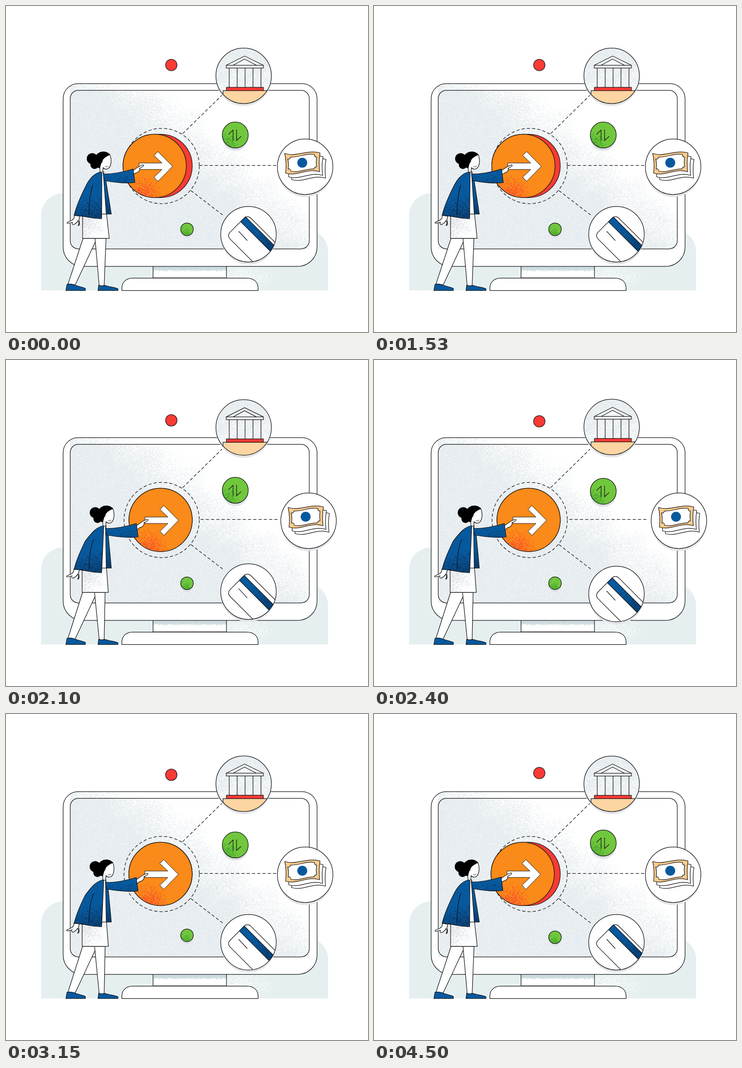
Write an HTML page with a canvas that moves like this. It is 789x710 px and loops after 4530 ms.

```html
<!DOCTYPE html>
<html lang="en">
<head>
<meta charset="utf-8">
<title>Send money</title>
<style>
html, body { margin: 0; width: 100%; height: 100%; overflow: hidden; background: #fff; }
canvas { display: block; width: 789px; height: 710px; }
</style>
</head>
<body>
<canvas id="stage" width="789" height="710"></canvas>
<script>
const LOOP = 4530;
const INK = '#121214', BLUE = '#07599d', NAVY = '#0a3765', ORANGE = '#fa8a19', RED = '#fa3a35',
  GREEN = '#70c73c', MOSS = '#3a982c', SAND = '#fdd5a2', TAN = '#fccb8a', TEAL = '#e6eff0', MIST = '#e6ecef';
const ctx = document.getElementById('stage').getContext('2d');

// Timing
const clamp = (v, a = 0, b = 1) => Math.min(b, Math.max(a, v));
const ease = u => u * u * (3 - 2 * u);
function track(t, keys) {
  if (t <= keys[0][0]) return keys[0][1];
  for (let i = 1; i < keys.length; i++) {
    const [t0, a] = keys[i - 1], [t1, b] = keys[i];
    if (t < t1) return a + (b - a) * ease((t - t0) / (t1 - t0));
  }
  return keys[keys.length - 1][1];
}
const TRACKS = {
  press: [[1400, 0], [2000, 1], [3100, 1], [3700, 0]],
  bank: [[1750, 0], [2250, -6.5], [3180, 0]],
  pull: [[1890, 0], [2280, 13.2], [3180, 0]],
  red: [[1500, 0], [2800, 6.5], [4000, -6.2], [4500, 0]],
  swap: [[1500, 0], [2800, 6.2], [4000, -3.6], [4500, 0]],
  pea: [[2300, 0], [3300, -4.5], [4500, 0]]
};

// Drawing helpers
function paint(path, fill, stroke = INK, width = 1.25) {
  if (fill) { ctx.fillStyle = fill; ctx.fill(path); }
  if (stroke) { ctx.strokeStyle = stroke; ctx.lineWidth = width; ctx.stroke(path); }
}
const shape = (d, fill, stroke, width) => paint(new Path2D(d), fill, stroke, width);
const disc = (x, y, r) => { const p = new Path2D(); p.arc(x, y, r, 0, 7); return p; };
const box = (x, y, w, h, r = 0) => { const p = new Path2D(); p.roundRect(x, y, w, h, r); return p; };
function inside(path, draw) {
  ctx.save();
  ctx.clip(path);
  draw();
  ctx.restore();
}
function shifted(x, y, draw) {
  ctx.save();
  ctx.translate(x, y);
  draw();
  ctx.restore();
}
function textured(path, fill, texture) {
  paint(path, fill, null);
  inside(path, texture);
  paint(path, null);
}

// Speckle textures, built once
let seed = 7;
function rand() {
  seed = (seed + 0x6d2b79f5) | 0;
  let r = Math.imul(seed ^ (seed >>> 15), 1 | seed);
  r ^= r + Math.imul(r ^ (r >>> 7), 61 | r);
  return ((r ^ (r >>> 14)) >>> 0) / 4294967296;
}
function grain(x, y, w, h, color, density) {
  const c = document.createElement('canvas');
  c.width = w; c.height = h;
  const g = c.getContext('2d');
  g.fillStyle = color;
  for (let j = 0; j < h; j++)
    for (let i = 0; i < w; i++)
      if (rand() < density(x + i, y + j)) g.fillRect(i, j, 1, 1);
  return () => ctx.drawImage(c, x, y);
}
const cloud = (x, y) => Math.sin(x * .051 + 2 * Math.sin(y * .033)) * Math.cos(y * .043 + Math.sin(x * .029));
const blot = (cx, cy, r, k) => (x, y) => k * clamp(1 - Math.hypot(x - cx, y - cy) / r);

const screenGrain = grain(140, 170, 521, 359, MIST, (x, y) => {
  if (y < 183) return .7 * clamp(1 - (x - 140) / 130);
  const d = (y - 183 - .87 * (x - 270)) / 1.33;
  return clamp(.5 + d / 120 + .12 * cloud(x, y), 0, .93);
});
const neckGrain = grain(320, 568, 160, 14, '#cbdbdf', (x, y) => clamp((578 - y) / 5));
const floorGrain = grain(481, 568, 110, 50, '#ffffff', (x, y) => .45 * clamp(1 - Math.hypot((x - 515) / 75, (y - 590) / 35)));
const buttonGrain = grain(-70, 15, 110, 56, RED, blot(-26, 62, 42, .5));
const swapGrain = grain(-29, -29, 58, 58, MOSS, blot(-20, 20, 28, .6));
const peaGrain = grain(-14, -14, 28, 28, MOSS, blot(-4, 8, 16, .5));
const bankGrain = grain(-61, -61, 122, 94, MIST, (x, y) => clamp(.72 - y / 160 + .2 * cloud(x * 2, y * 2), 0, .9));
const stripeGrain = grain(0, -58, 130, 15, NAVY, x => .75 * clamp((x - 20) / 70));
const coatGrain = grain(146, 360, 86, 105, NAVY, (x, y) => clamp((y - 412) / 65 + (x - 190) / 260, 0, .8));
const sleeveGrain = grain(212, 354, 74, 34, NAVY, (x, y) => .35 * clamp((y - 366) / 22));
const skirtGrain = grain(165, 453, 60, 53, '#dcdfe3', blot(172, 468, 48, .7));

function monitor() {
  shape('M76.500,619.500V456A48,48 0 0 1 124.500,408H400V619.500Z', TEAL, null);
  shape('M440,619.500V488H656A46,46 0 0 1 702,534V619.500Z', TEAL, null);
  floorGrain();
  paint(box(320.5, 560, 160, 32), '#fff', null);
  neckGrain();
  paint(box(320.5, 560, 160, 32), null);
  shape('M252.500,619.500V614C253,601 262,592.500 276,592.500H525C540,592.500 549,601 549.500,614V619.500Z', '#fff');
  textured(box(124.5, 169, 553.5, 398, [33, 33, 42, 42]), '#fff', screenGrain);
  paint(box(140, 183.5, 521, 345.5, 18), null);
}

function dashes(pull) {
  ctx.setLineDash([7, 4.5]);
  shape('M385,278L471,194');
  shape('M403,402L472,455');
  ctx.lineDashOffset = -pull * .38;
  shape('M421,347.300H594');
  ctx.lineDashOffset = 0;
  paint(disc(339.3, 348.5, 82), null);
  ctx.setLineDash([]);
}

function button(x) {
  const cy = 348.3;
  const side = new Path2D();
  side.arc(x, cy, 69, Math.PI / 2, Math.PI * 1.5);
  side.arc(337, cy, 69, -Math.PI / 2, Math.PI / 2);
  side.closePath();
  paint(side, RED);
  textured(disc(x, cy, 69), ORANGE, () => shifted(x, cy, buttonGrain));
  shifted(x - 337, 0, () =>
    shape('M303,342H353L335.500,325.500L344,317L376,349.300L344,382L335.500,373L353,356H303Z', '#fff', INK, 1));
}

function ball(x, y, r, color, texture, drop) {
  if (drop) paint(disc(x, y + drop, r), '#dfe1e5', null);
  const p = disc(x, y, r);
  if (texture) textured(p, color, () => shifted(x, y, texture));
  else paint(p, color);
}

// Round badge with a soft drop below; content uses stage coordinates at rest
function badge(cx, cy, dx, dy, content) {
  shifted(dx, dy, () => {
    paint(disc(cx, cy + 6, 60), '#e3e4e8', null);
    textured(disc(cx, cy, 60.5), '#fff', content);
  });
}

function bank() {
  shifted(518, 152, bankGrain);
  paint(box(473, 184.3, 120, 40), SAND);
  paint(box(480.5, 177, 80.5, 7.3), RED);
  for (let i = 0; i < 5; i++) shape(`M${486.5 + 17.3 * i},135V177`);
  shape('M480,129L520,109L561,129V135H480Z', '#f5f8f9');
  shape('M480,129H561M495,129L520,115.500L546,129');
}

function bills() {
  const note = new Path2D('M607.500,321C632,330 655,312 684.500,320C682,334 682,347 683.500,361C655,352 635,372 609.500,364C611,350 611,336 607.500,321Z');
  shifted(13, 14, () => paint(note, '#fff'));
  shifted(6.5, 8, () => paint(note, '#fff'));
  paint(note, TAN);
  shape('M620,329C638,330 654,320 672,323C672,327 674,329 677,329C676,337 676,344 677,350C674,350 672,352 671,355C654,354 638,364 621,360C621,356 618,354 615,355C616,347 616,340 614,333C618,334 620,332 620,329Z', '#fff');
  paint(disc(645.7, 341.3, 10.8), BLUE, null);
}

function card(slip) {
  ctx.save();
  ctx.translate(481, 500);
  ctx.rotate(Math.PI / 4);
  paint(box(0, -64, 170, 64, 10), '#fff');
  shifted(0, slip, () => textured(box(0, -58, 130, 15), BLUE, stripeGrain));
  ctx.restore();
  shape('M507,490.500L526,511');
}

function woman(p) {
  const skin = '#fff';
  // legs and shoes
  shape(`M${168 - p},506L135,606C141,610 147,610 151,607L195,513V506Z`, skin);
  shape(`M${194 - p},506L203,608C207,611 211,611 214,608L${218 - 2 * p},506Z`, skin);
  shape('M130.500,619.500L133,606C140,604 144,606 149,607C157,611 168,612 173,615V619.500Z', BLUE);
  shape('M200.500,619.500L202,608C209,612 213,607 218,609C227,612 239,613 244,616V619.500Z', BLUE);
  // skirt
  textured(new Path2D(`M${167 - p},453L${167 - p},506H${225 - 2 * p}L219,452Z`), '#fff', skirtGrain);
  // rear hand
  shifted(-p, -p, () => shape('M149,456C149,462 148,464 143,467L134,471C132,473 134,474 137,473L145,471C143,474 145,477 148,476C153,473 156,471 157,467C160,472 160,475 157,478C161,479 161,472 159,465L161,458Z', skin));
  // shirt and coat
  const s = 5 * p;
  shape(`M${206 + s},361L${213 + s},361L219,453H207Z`, '#fff');
  textured(new Path2D(`M${208 + s},361C${190 + s},364 ${180 + s},379 173,394C163,414 153,437 148.500,456C168,456 188,464 208.500,463L${209 + s * .8},364Z`
    + `M${212 + s},363L${218 + s},382L229.500,453H218.500Z`), BLUE, coatGrain);
  shape(`M${189 + s * .6},390C183,408 181,432 181,455`);
  // pointing hand and sleeve
  shifted(9.5 * p, p, () => shape('M273,361C281,356 286,350 298,346C302,346 301,349 291,353.500C293,357 289,363 282,364L275,370Z', skin));
  shifted(7 * p, p, () => textured(
    new Path2D(`M${212 - 2 * p},366C235,366 258,361 277,355L281,384.500C258,387 233,384 ${214 - 2 * p},380Z`), BLUE, sleeveGrain));
  // head
  shifted(6.5 * p, 0, () => {
    shape('M204,348L205,361C208,363 211,362 211,360L211.500,352C214,355 218,356 222,354.500C230,350 231,334 226,323L211,325Z', skin);
    paint(disc(188, 332.5, 12), '#000', null);
    paint(disc(193, 346, 9), '#000', null);
    shape('M196,326C201,316 219,313 227,324C219,328 210,332 210,340C207,341 206,350 205,353C199,354 194,347 195,338Z', '#000', null);
    shape('M216,349.500C218,351 221,350.500 223,348', null, INK, 1);
  });
}

function draw(t) {
  const v = {};
  for (const k in TRACKS) v[k] = track(t, TRACKS[k]);
  ctx.fillStyle = '#fff';
  ctx.fillRect(0, 0, 789, 710);
  ctx.lineJoin = 'round';
  monitor();
  dashes(v.pull);
  button(324 + 13 * v.press);
  ball(360.3, 128.5 + v.red, 12.5, RED);
  ball(499.7, 281 + v.swap, 28.3, GREEN, swapGrain, 6);
  shifted(0, v.swap, () => shape('M485,279.500L495,270V294M502.500,269V293L512.500,284'));
  ball(394.5, 486.3 + v.pea, 13.8, GREEN, peaGrain, 5);
  badge(518, 152, 0, v.bank, bank);
  badge(652, 350, v.pull, 0, bills);
  badge(528.5, 497, 0, v.pull, () => card(4 * v.press));
  woman(v.press);
}

const start = performance.now();
function tick() {
  draw((performance.now() - start) % LOOP);
  requestAnimationFrame(tick);
}
tick();
</script>
</body>
</html>
```
